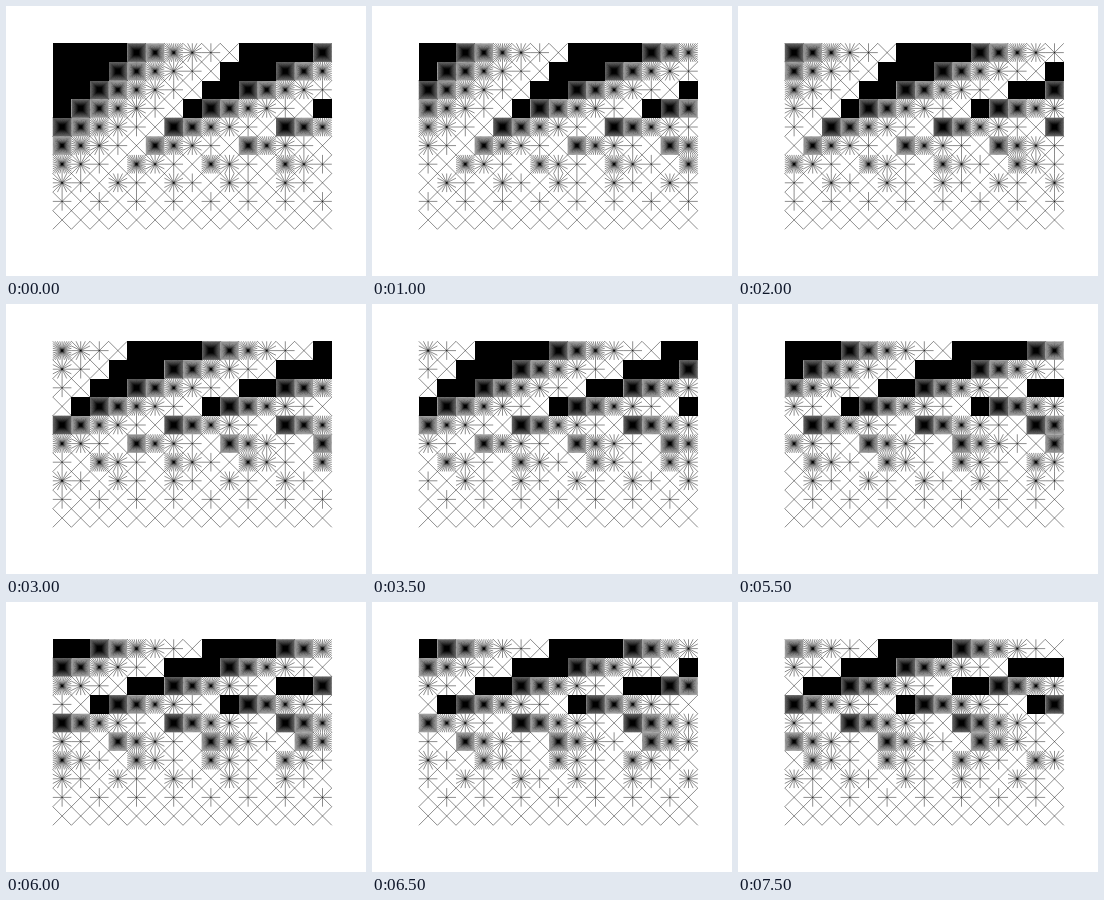
An HTML page with a canvas that plays this animation: 360 by 270 pixels, repeating every 8000 ms.

```html
<!DOCTYPE html>
<html lang="en">
<head>
<meta charset="utf-8">
<title>Star waves</title>
<style>
html, body { margin: 0; width: 100%; height: 100%; overflow: hidden; background: #fff; }
canvas { display: block; }
</style>
</head>
<body>
<canvas id="stage" width="360" height="270"></canvas>
<script>
const ctx = document.getElementById('stage').getContext('2d');
const COLS = 15, ROWS = 10, CELL = 18.6, LEFT = 46.8, TOP = 37.3;
const STEP = 500, STEPS = 16, SOLID = 6;

// Point on the border of a unit-radius square, u in 0..1, starting at a corner.
function border(u) {
  const side = Math.floor(u * 4);
  const d = (u * 4 - side) * 2 - 1;
  return [[d, -1], [1, d], [-d, 1], [-1, -d]][side];
}

// Each level doubles the number of spokes; the highest ones fill the cell.
function star(col, row, level) {
  const x = LEFT + col * CELL, y = TOP + row * CELL;
  if (level >= SOLID) {
    const x0 = Math.round(x), y0 = Math.round(y);
    ctx.fillRect(x0, y0, Math.round(x + CELL) - x0, Math.round(y + CELL) - y0);
    return;
  }
  const r = CELL / 2, cx = x + r, cy = y + r;
  const half = 2 ** (level + 1);
  ctx.beginPath();
  for (let i = 0; i < half; i++) {
    const [dx, dy] = border(i / half / 2);
    ctx.moveTo(cx - dx * r, cy - dy * r);
    ctx.lineTo(cx + dx * r, cy + dy * r);
  }
  ctx.stroke();
}

function draw(step) {
  ctx.fillStyle = '#fff';
  ctx.fillRect(0, 0, 360, 270);
  ctx.fillStyle = ctx.strokeStyle = '#000';
  ctx.lineWidth = 0.45;
  for (let row = 0; row < ROWS; row++) {
    const period = ROWS - row;
    for (let col = 0; col < COLS; col++) {
      star(col, row, period - 1 - (col + step) % period);
    }
  }
}

let shown = -1;
const start = performance.now();
function tick() {
  const step = Math.floor((performance.now() - start) / STEP) % STEPS;
  if (step !== shown) draw(shown = step);
  requestAnimationFrame(tick);
}
tick();
</script>
</body>
</html>
```
